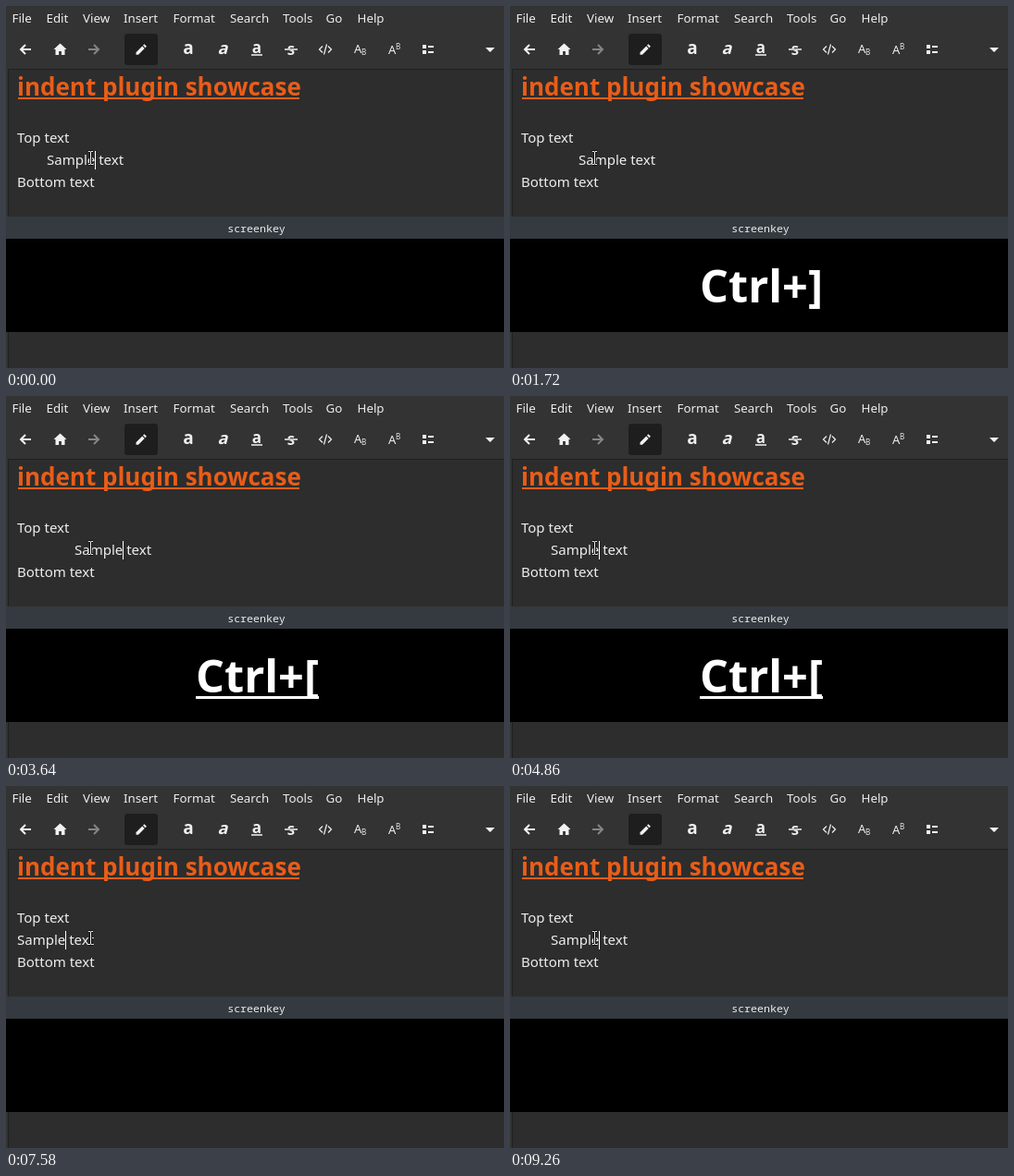
Animation of 538x392 px, one loop 9500 ms. Source, as an HTML page:

```html
<!DOCTYPE html>
<html lang="en">
<head>
<meta charset="utf-8">
<title>Indent plugin showcase</title>
<style>
  html, body { margin: 0; width: 100%; height: 100%; overflow: hidden; background: #2d2d2d; }
  svg { display: block; }
  text { font-family: "Noto Sans", sans-serif; fill: #eee; white-space: pre; }
  .menu { font-size: 13.33px; }
  .body { font-size: 15px; }
  .bold { font-weight: 700; }
  .line { fill: none; stroke: #f2f2f2; stroke-width: 2; }
</style>
</head>
<body>
<svg width="538" height="392" viewBox="0 0 538 392">
  <rect width="538" height="392" fill="#333"/>
  <rect x="2" y="68" width="536" height="324" fill="#202020"/>
  <rect x="3" y="69" width="535" height="323" fill="#2d2d2d"/>
  <g id="menu" class="menu"></g>

  <!-- toolbar -->
  <rect x="128" y="30" width="36" height="34" rx="3" fill="#1e1e1e"/>
  <path class="line" d="M27 47H16M21 42l-5 5 5 5"/>
  <path d="M58.5 40.5L51.5 47h2v6h3.6v-4h2.8v4h3.6v-6h2z" fill="#f2f2f2"/>
  <path class="line" d="M89 47h11M95 42l5 5-5 5" style="stroke:#858585"/>
  <path d="M140.5 50.2l6.7-6.7 2.5 2.5-6.7 6.7h-2.5zM148 42.7l1.4-1.4 2.5 2.5-1.4 1.4z" fill="#f2f2f2"/>
  <g class="bold" text-anchor="middle">
    <text x="197" y="52" font-size="19" font-weight="900">a</text>
    <text transform="translate(234 52) skewX(-14)" font-size="18">a</text>
    <text x="271" y="50.5" font-size="17">a</text>
    <text x="308" y="52.5" font-size="15">S</text>
  </g>
  <path d="M301 46h14v2h-14z" fill="#333"/>
  <path class="line" d="M265 53h12M301 47h14" style="stroke-width:1.5"/>
  <path class="line" d="M342 43.5l-3.5 3.5 3.5 3.5M348 43.5l3.5 3.5-3.5 3.5M346.5 41.5l-3 11" style="stroke-width:1.2"/>
  <text x="376" y="51" font-size="13">A</text><text x="384" y="53" font-size="8">B</text>
  <text x="413" y="52" font-size="13">A</text><text x="421" y="47" font-size="8">B</text>
  <path d="M450 42h4v4h-4zM450 48h4v4h-4zM456 43h6v2h-6zM456 49h6v2h-6zM518 45h10l-5 5z" fill="#f2f2f2"/>

  <!-- page -->
  <text x="12" y="97" class="bold" font-size="26" style="fill:#e95d18">indent plugin showcase</text>
  <rect x="13" y="99" width="304" height="2" fill="#e95d18"/>
  <g class="body">
    <text x="12" y="148">Top text</text>
    <text id="sample" y="172">Sample text</text>
    <text x="12" y="196">Bottom text</text>
  </g>
  <rect id="caret" y="157" width="1" height="20" fill="#fff"/>
  <g fill="none">
    <path id="beam" d="M89 157.5h2l.5.5.5-.5h2M91.5 158v13M89 171.5h2l.5-.5.5.5h2" stroke="#111" stroke-width="3"/>
    <use href="#beam" style="--w:1"/>
    <path d="M89 157.5h2l.5.5.5-.5h2M91.5 158v13M89 171.5h2l.5-.5.5.5h2" stroke="#eee"/>
  </g>

  <!-- key display -->
  <rect y="228" width="538" height="24" fill="#343a3f"/>
  <text x="270.5" y="245" text-anchor="middle" font-size="11.6" style="font-family:'Noto Sans Mono',monospace">screenkey</text>
  <rect y="252" width="538" height="101" fill="#000"/>
  <g id="key">
    <text id="label" x="205" y="321" class="bold" font-size="48.7" style="fill:#fff"></text>
    <rect id="under" x="205" y="325" width="133" height="3" fill="#fff"/>
  </g>
</svg>
<script>
const LOOP = 9500, SHOWN = 940, RECENT = 260;
const $ = id => document.getElementById(id);

const menu = [["File", 6.5], ["Edit", 43.5], ["View", 83], ["Insert", 127], ["Format", 180.5],
  ["Search", 242], ["Tools", 299], ["Go", 345.5], ["Help", 379.5]];
$("menu").innerHTML = menu.map(([s, x]) => `<text x="${x}" y="18">${s}</text>`).join("");

// left offset of the sample line per indent level
const offsets = [0, 32, 62, 92];
// time of each shortcut and the bracket pressed
const presses = [[1080, "]"], [2280, "]"], [3600, "["], [4860, "["], [6180, "["], [7620, "]"]];
// spans in which the caret is hidden
const hidden = [[200, 580], [1640, 1960], [2840, 3160], [4180, 4500], [5340, 5580],
  [6780, 7580], [8100, 8420], [8820, 9220]];

const show = (id, on) => $(id).setAttribute("visibility", on ? "inherit" : "hidden");

function draw(t) {
  const past = presses.filter(p => p[0] <= t);
  const level = past.reduce((n, p) => n + (p[1] === "]" ? 1 : -1), 1);
  const [since, bracket] = past.at(-1) || [-LOOP, ""];
  $("sample").setAttribute("x", 12 + offsets[level]);
  $("caret").setAttribute("x", 64 + offsets[level]);
  show("caret", !hidden.some(([a, b]) => t >= a && t < b));
  $("label").textContent = "Ctrl+" + bracket;
  show("key", t - since < SHOWN);
  show("under", t - since < RECENT);
}

const start = performance.now();
function tick() {
  draw((performance.now() - start) % LOOP);
  requestAnimationFrame(tick);
}
tick();
</script>
</body>
</html>
```
